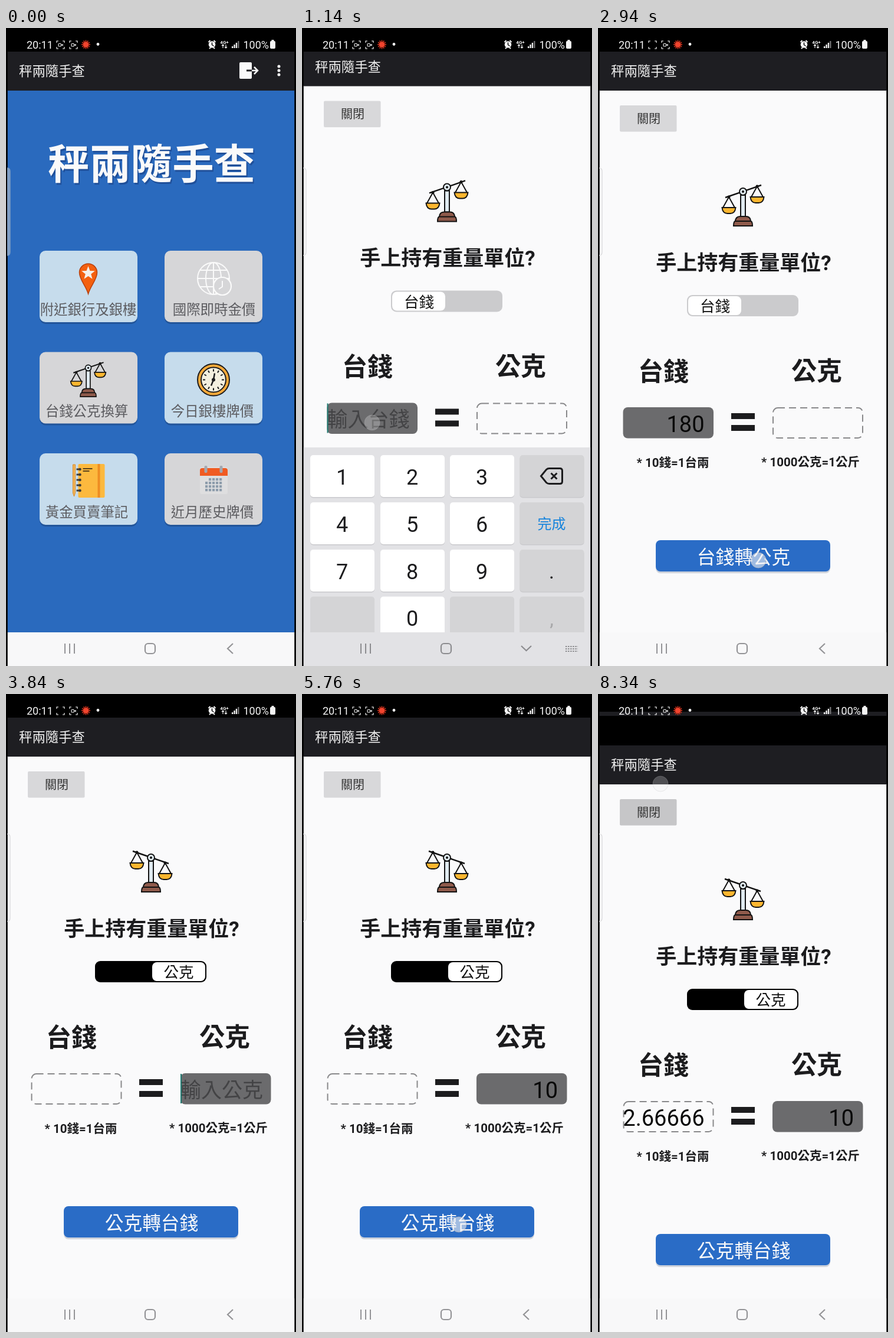
An HTML page for the animation above (8400 ms loop, 492 px wide and 1080 px high).

```html
<!DOCTYPE html>
<html lang="zh-Hant">
<head>
<meta charset="utf-8">
<style>
html, body { margin: 0; width: 100%; height: 100%; overflow: hidden; background: #000; }
svg { display: block; width: 492px; height: 1080px; }
text { font-family: Roboto, 'Noto Sans CJK TC', 'Noto Sans CJK', sans-serif; }
</style>
</head>
<body>
<svg id="stage" viewBox="0 0 492 1080"></svg>
<script>
const LOOP = 8400, APP = '秤兩隨手查';
const PAPER = '#fafafb', BAR = '#1e1e22', INK = '#1c1c1e', BLUE = '#2a6cc6', KEYS = '#e2e2e5';
const stage = document.getElementById('stage');

// Drawing helpers returning SVG markup
const rect = (x, y, w, h, fill, r = 0, more = '') =>
  `<rect x="${x}" y="${y}" width="${w}" height="${h}" rx="${r}" fill="${fill}" ${more}/>`;
const circle = (x, y, r, fill, more = '') => `<circle cx="${x}" cy="${y}" r="${r}" fill="${fill}" ${more}/>`;
const path = (d, stroke, width = 2, fill = 'none', more = '') =>
  `<path d="${d}" stroke="${stroke}" stroke-width="${width}" fill="${fill}" ${more}/>`;
const text = (s, x, midY, size, fill, anchor = 'middle', weight = 400) =>
  `<text x="${x}" y="${midY + size * .37}" font-size="${size}" fill="${fill}" text-anchor="${anchor}" font-weight="${weight}">${s}</text>`;
const group = (x, y, body, scale = 1) => `<g transform="translate(${x} ${y}) scale(${scale})">${body}</g>`;
const around = (n, fn) => Array.from({ length: n }, (_, i) => fn(i * 360 / n)).join('');

// Timing helpers
const clamp = v => Math.max(0, Math.min(1, v));
const ease = (t, from, length) => 1 - (1 - clamp((t - from) / length)) ** 3;
const latest = (t, steps) => steps.filter(s => s[0] <= t).pop();

// Taps: x, y, press time, release time
const taps = [
  [139, 610, 100, 220], [119, 668, 930, 1030],
  [68, 738, 1530, 1640], [179, 891, 1790, 1900], [188, 974, 2080, 2180], [424, 816, 2450, 2540],
  [272, 901, 2860, 2990], [290, 470, 3540, 3640], [374, 668, 3930, 4030],
  [88, 746, 4340, 4450], [186, 976, 4820, 4920], [424, 816, 5240, 5330],
  [266, 898, 5670, 5780], [106, 152, 8090, 8220]
];
const OPEN = 270, TOGGLE = 3640, CLOSE = 8270;
const leftText = [[OPEN + 160, ''], [1640, '1'], [1900, '18'], [2180, '180'], [TOGGLE, ''], [5840, '2.66666']];
const rightText = [[OPEN, ''], [3050, '675'], [TOGGLE, ''], [4450, '1'], [4920, '10']];

const pressed = (t, x, y, w, h) => taps.some(([a, b, from, to]) =>
  t >= from && t < to && a > x && a < x + w && b > y && b < y + h);

function touches(t) {
  return taps.map(([x, y, from, to]) => {
    const o = t < from ? 0 : clamp(1 - (t - to) / 200);
    return o ? circle(x, y, 13, '#f2f2f4', `fill-opacity="${o * .6}" stroke="#b4b4b8" stroke-opacity="${o * .7}"`) : '';
  }).join('');
}

function scales(flip) {
  const line = '#121212';
  const pan = (x, y) => path(`M${x - 10} ${y + 18}L${x} ${y}L${x + 10} ${y + 18}`, line) +
    path(`M${x - 11.5} ${y + 18}h23q-1 10-9 10h-5q-8 0-9-10z`, line, 2, '#fdb62f') + circle(x, y, 2.5, line);
  const beam = path('M-30-14L31-35', line, 2.4) + pan(-24, -15) + pan(24, -33);
  return path('M-4-18V18H4V-18z', line, 2, '#dfeaf0') +
    path('M-13 27q0-9 8-9h10q8 0 8 9z', line, 2, '#8f5a4b') +
    path('M-13 26h26q3 0 3 8h-32q0-8 3-8z', line, 2, '#8f5a4b') +
    `<g transform="scale(${flip ? -1 : 1} 1)">${beam}</g>` +
    circle(0, -24, 6, '#dfeaf0', `stroke="${line}" stroke-width="2"`) + circle(0, -24, 2, line);
}

const star = 'M' + Array.from({ length: 10 }, (_, i) => {
  const r = i % 2 ? 5 : 12, a = i * Math.PI / 5;
  return `${r * Math.sin(a)} ${-9 - r * Math.cos(a)}`;
}).join('L') + 'z';

const icons = {
  pin: path('M0 26C-4 12-15 2-15-10A15 15 0 0 1 15-10C15 2 4 12 0 26z', '#b9400c', 1.5, '#f4600f') + path(star, 'none', 0, '#f4f0ea'),
  globe: `<g fill="none" stroke="#fafafa" stroke-width="2"><circle cx="0" cy="0" r="27"/><ellipse rx="13" ry="27"/>
    <path d="M0-27V27M-27 0H27M-23-14H23M-23 14H23"/></g>` +
    circle(15, 13, 15, '#d6d6d8', 'stroke="#fafafa" stroke-width="2.2"') + path('M15 4V14L9 18', '#fafafa'),
  clock: circle(0, 0, 27, '#f5a93a', `stroke="${INK}" stroke-width="2"`) +
    circle(0, 0, 21, '#f4f0e0', `stroke="${INK}" stroke-width="2"`) +
    around(12, a => path('M0-18V-14', INK, 2, 'none', `transform="rotate(${a})"`)) +
    path('M2-11L0 0L-4 10', INK, 2.5) + circle(0, 0, 3, INK),
  book: rect(-17, -29, 45, 57, '#fcb93e', 2) + rect(16, -29, 4, 57, '#ee8c22') +
    path('M-9-21H7M-9-17H2', '#5a421c', 2) +
    [-20, -11, -2, 7, 16].map(y => path(`M-20 ${y}h7`, '#403c38', 3) + circle(-14, y, 2.3, '#403c38')).join('') +
    path('M-26-28h4v48l-2 6l-2-6z', '#d98a28', 1, '#f0b458'),
  calendar: rect(-23, -24, 47, 46, '#dededf', 3) + path('M-23-9v-9q0-4 4-4h39q4 0 4 4v9z', 'none', 0, '#f05b22') +
    [-13, 13].map(x => rect(x - 2.5, -26, 5, 12, '#a4a8b0', 2)).join('') +
    [-3, 3, 9, 15].map((y, r) => [-12, -6, 0, 6, 12].slice(r ? 0 : 1)
      .map(x => rect(x - 2, y - 2, 4.2, 4.2, '#8d9cab')).join('')).join('')
};

function header(menu) {
  const c = '#fafafa';
  return rect(2.5, 40, 487, 66, BAR) + text(APP, 22, 73, 22.4, '#f2f2f2', 'start') +
    (menu ? rect(396, 58, 21, 28, c, 2) + path('M408 72h9', BAR, 3) +
      path('M417 72h9M421 66l6 6l-6 6', c, 2.5) + [65, 72, 79].map(y => circle(463, y, 2.5, c)).join('') : '');
}

function home(t) {
  const cards = [
    ['附近銀行及銀樓', 'pin'], ['國際即時金價', 'globe'], ['台錢公克換算', 'scales'],
    ['今日銀樓牌價', 'clock'], ['黃金買賣筆記', 'book'], ['近月歷史牌價', 'calendar']
  ].map(([label, icon], i) => {
    const right = i % 2, x = right ? 269 : 57, y = 377 + (i >> 1) * 171.5;
    const fill = [0, 3, 4].includes(i) ? '#c6dcec' : '#d6d6d8';
    const cx = i ? (i === 1 ? 353 : right ? 350 : 137) : 139.5;
    const art = icon === 'scales' ? group(139.5, y + 47, scales(false), .84) : group(right ? 352 : 139.5, y + 47, icons[icon]);
    return rect(x, y + 3, 166, 121, '#22559a', 10) +
      rect(x, y, 166, 121, pressed(t, x, y, 166, 121) ? '#b8b8ba' : fill, 10) + art +
      text(label, cx, y + 99.5, 23.4, '#5c5c60', 'middle', 500);
  }).join('');
  return rect(0, 0, 492, 1080, '#000') + rect(2.5, 105, 487, 918, '#2a6abe') + header(true) +
    text(APP, 249, 233, 70.4, '#20509a', 'middle', 700) +
    text(APP, 247, 230, 70.4, '#fafafa', 'middle', 700) + cards;
}

function field(x, active, value, hint, cursor) {
  const box = active ? rect(x, 642, 153.5, 52.5, '#6b6b6d', 8)
    : rect(x + 1, 643, 152, 51, 'none', 8, 'stroke="#88888a" stroke-width="2" stroke-dasharray="12 7"');
  const content = value ? text(value, x + 138, 670, 38, '#080808', 'end')
    : active ? text(hint, x, 670, 35, '#434345', 'start') : '';
  return box + content + (active && cursor ? rect(value ? x + 136.5 : x, 643, 2, 50, '#1f7a70') : '');
}

function converter(t) {
  const grams = t >= TOGGLE;
  const left = latest(t, leftText) || leftText[0], right = latest(t, rightText);
  // The cursor blink restarts with each edit
  const cursor = (t - (grams ? right : left)[0]) % 500 < 250;
  return rect(0, -10, 492, 1100, '#000') + rect(2.5, 105, 487, 985, PAPER) + header(false) +
    rect(37, 131, 96.5, 44.5, t > 8090 ? '#c6c6c8' : '#d8d8da', 2) + text('關閉', 86, 153.5, 20, '#333') +
    group(246, 301, scales(grams)) +
    text('手上持有重量單位?', 247, 397, 35, INK, 'middle', 700) +
    rect(151, 452, 189, 36, grams ? '#000' : '#cbcbcd', 9) +
    rect(grams ? 248 : 153, 454, 90, 32, '#fff', 8) +
    text(grams ? '公克' : '台錢', grams ? 293 : 198.5, 471, 25.5, '#111') +
    text('台錢', 111, 581, 43, INK, 'middle', 700) + text('公克', 371, 580, 43, INK, 'middle', 700) +
    field(42.5, !grams, left[1], '輸入台錢', cursor) + field(296, grams, right[1], '輸入公克', cursor) +
    rect(226, 652, 40, 10, INK) + rect(226, 672, 40, 10, INK) +
    text('* 10錢=1台兩', 127, 735, 20.5, INK, 'middle', 700) +
    text('* 1000公克=1公斤', 360.5, 734, 20.5, INK, 'middle', 700) +
    rect(98, 870, 296, 53, '#d0d4dc', 8) + rect(98, 867, 296, 53, BLUE, 8) +
    text(grams ? '公克轉台錢' : '台錢轉公克', 247, 895, 31.7, '#fafafa');
}

function keyboard(t) {
  const xs = [14, 133, 251, 369.5], ys = [699, 779, 859, 938.5];
  const keys = ['1', '2', '3', 'del', '4', '5', '6', '完成', '7', '8', '9', '.', '', '0', '', ','];
  return rect(2.5, 686, 487, 394, KEYS) + keys.map((k, i) => {
    const x = xs[i % 4], y = ys[i >> 2], cx = x + 54, cy = y + 36.5, digit = /\d/.test(k);
    const down = pressed(t, x, y, 109, 71);
    const cap = k === 'del'
      ? path(`M${cx - 18} ${cy - 1}l9-11q2-2 5-2h18q4 0 4 4v18q0 4-4 4h-18q-3 0-5-2zM${cx - 1} ${cy - 6}l10 10m0-10l-10 10`, INK, 3)
      : k === '完成' ? text(k, cx, cy, 24, '#1583dc')
      : digit ? text(k, cx, cy, 36, down ? '#606062' : INK)
      : text(k, cx, cy, 34, k === ',' ? '#a8a8aa' : INK);
    return rect(x, y + 1.5, 109, 71, '#cacacd', 5) +
      rect(x, y, 109, 71, down ? '#a0a0a2' : digit ? '#fff' : '#d4d4d6', 5) + cap;
  }).join('');
}

function statusBar(t, height) {
  const white = '#f4f4f4';
  const cam = (x, on) => path(`M${x - 6} 25v-3h3m7 0h3v3m0 7v3h-3m-7 0h-3v-3`, white, 1.2) +
    (on ? rect(x - 3, 26.5, 4.5, 4.5, 'none', 1, `stroke="${white}" stroke-width="1.1"`) + path(`M${x + 2} 28.7l2.5-1.5v3z`, white, .5, white) : '');
  return rect(0, 0, 492, height, '#000') + text('20:11', 35, 28, 18, white, 'start') +
    cam(92, t % 1050 < 525) + cam(114, true) +
    around(12, a => path('M0-7.5V0', '#c8301c', 1.8, 'none', `transform="translate(135.5 28) rotate(${a})"`)) +
    circle(135.5, 28, 4.5, '#f2442e') + circle(156, 27.5, 2.4, white) +
    circle(349.5, 28, 5.8, white) + path('M349.5 24.5V28.5l3 2', '#000', 1.4) +
    path('M343.5 24l3-3M355.5 24l-3-3M345 35l2-2M354 35l-2-2', white, 2) +
    text('4G+', 370.5, 24, 8, white, 'middle', 700) +
    path('M368 28v6m-2-4l2-2l2 2M373 28v6m-2-2l2 2l2-2', white, 1.2) +
    [0, 1, 2, 3].map(i => rect(383 + i * 3.4, 31 - i * 3, 2.3, 3 + i * 3, i < 3 ? white : '#747476')).join('') +
    text('100%', 402.5, 28, 18, white, 'start') +
    rect(448, 22, 9, 13, white, 2) + rect(450.5, 20, 4, 3, white);
}

function navBar(typing) {
  const c = typing ? '#8c8c8f' : '#949497';
  return rect(2.5, 1023, 487, 57, typing ? KEYS : '#f8f8f9') +
    path('M100 1042v17M108 1042v17M116 1042v17', c, 2) +
    rect(236, 1042, 17, 17, 'none', 5, `stroke="${c}" stroke-width="2.2"`) +
    path(typing ? 'M372 1046l8.5 8l8.5-8' : 'M385 1042l-9 8.5l9 8.5', c, 2.2) +
    (typing ? [1047, 1051, 1055].map(y => path(`M447 ${y}h21`, c, 2.2, 'none', 'stroke-dasharray="2.4 1.7"')).join('') : '');
}

function draw(t) {
  const kb = ease(t, 1050, 150) - ease(t, 2560, 130) + ease(t, 4050, 150) - ease(t, 5350, 130);
  const opening = ease(t, OPEN, 160), closing = clamp((t - CLOSE) / 70), typing = kb > .02;
  const dy = 1040 * (1 - opening) + 47 * closing ** 2 - 8 * kb;
  let svg = '';
  if (opening < 1 || closing) svg += group(0, closing ? -10 : 0, home(t));
  if (opening) svg += group(0, dy, converter(t));
  if (typing) svg += group(0, 394 * (1 - kb), keyboard(t));
  svg += navBar(typing) +
    rect(0, 40, 2.5, 1040, '#000') + rect(489.5, 40, 2.5, 1040, '#000') +
    path('M2 237q5 0 5 6v136q0 6-5 6', opening ? '#dcdcde' : '#7d9cc0', 1.3, opening ? 'none' : '#7f9ec4') +
    statusBar(t, closing ? 30 : 40) + touches(t);
  stage.innerHTML = svg;
}

function tick() {
  draw(performance.now() % LOOP);
  requestAnimationFrame(tick);
}
tick();
</script>
</body>
</html>
```
